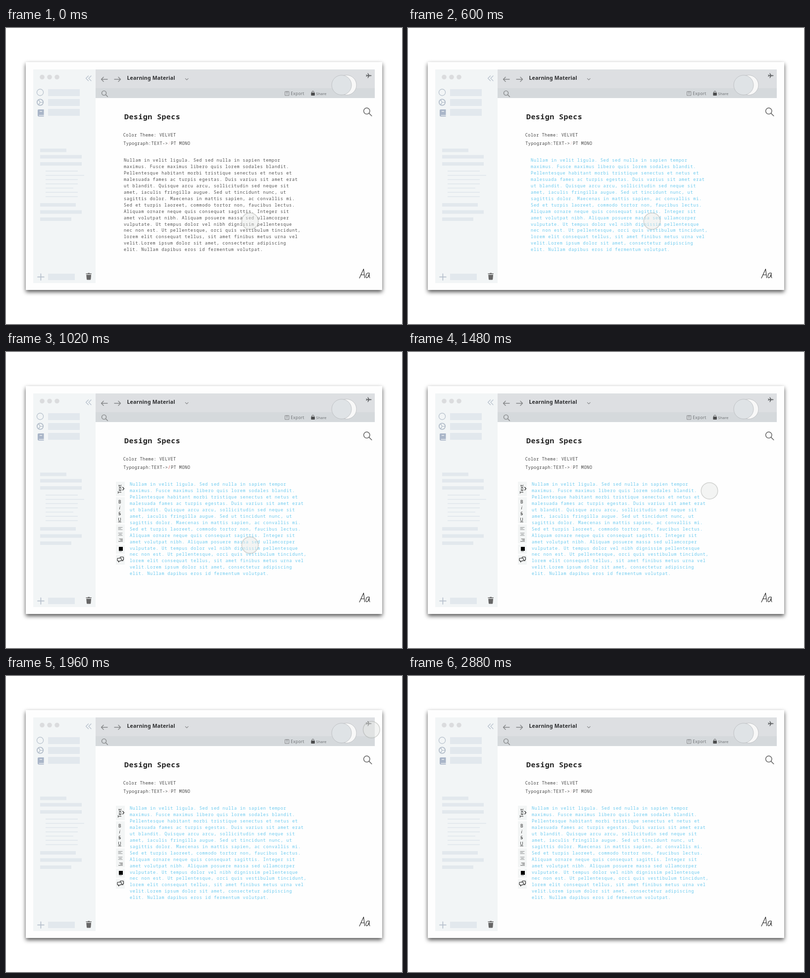
Recreate the animation shown at these times as an HTML page. Size 800 by 600 pixels, loop 3.34 s.

```html
<!DOCTYPE html>
<html lang="en">
<head>
<meta charset="utf-8">
<title>Text selection toolbar</title>
<style>
  html, body { margin: 0; width: 100%; height: 100%; overflow: hidden; background: #fff; }
  svg { display: block; }
  text { white-space: pre; }
  .line { fill: none; stroke-linecap: round; stroke-linejoin: round; }
  .mono { font-family: "Noto Sans Mono", "DejaVu Sans Mono", monospace; font-size: 8.5px; }
  .sans { font-family: "Noto Sans", "Open Sans", sans-serif; }
  .window { fill: #fefefe; filter: drop-shadow(0 4px 4px rgba(0, 0, 0, .68)); }
</style>
</head>
<body>
<svg width="800" height="600" viewBox="0 0 800 600">
  <defs><clipPath id="frame"><path d="M40 69h720v462H40z"/></clipPath></defs>
  <path class="window" d="M40 69h720v462H40z"/>

  <!-- sidebar -->
  <path fill="#f2f5f6" d="M55 84h126v433H55z"/>
  <g fill="#dbdcde">
    <circle cx="73" cy="99.5" r="4.8"/><circle cx="88" cy="99.5" r="4.8"/><circle cx="103" cy="99.5" r="4.8"/>
  </g>
  <g id="bars" fill="#e2e8ed"></g>
  <g class="line" stroke="#b6c0cc" stroke-width="1.2">
    <path d="M166.5 97l-5 5 5 5m5.5-10l-5 5 5 5"/>
    <circle cx="69" cy="130.5" r="6.6"/>
    <circle cx="69" cy="150.6" r="6.2" stroke-width="1.9"/>
    <path stroke-width="1.4" d="M69 150.6h5.5M69 150.6l-3-5M69 150.6l-3 5"/>
    <path stroke-width="1.7" d="M64 504.7h12.8M70.4 498.3v12.8"/>
  </g>
  <path fill="#a9b5c8" d="M66 165h10.5v11.5H66.5v1.3h10v1.7H66q-2-.3-2-2.500V167q0-2 2-2z"/>
  <path fill="#f2f5f6" d="M68 168.500h5v1.300h-5z"/>
  <path fill="#666" d="M161.500 497.500h3.500l.7-1h3l.7 1h3.400v1.500h-11.300zM162.200 500.200h9.900l-.8 9q-.1 1.300-1.300 1.300h-5.700q-1.200 0-1.300-1.300z"/>

  <!-- header -->
  <path fill="#dddfe2" d="M181 84h564v38H181z"/>
  <path fill="#d5d9dc" d="M181 122h564v20H181z"/>
  <g class="line" stroke="#858789" stroke-width="1.4">
    <path d="M205 104h-12.5m4.5-4.5l-4.5 4.5 4.5 4.5M219 104h12.5m-4.5-4.5l4.5 4.5-4.5 4.5"/>
    <path stroke-width="1.1" d="M362.3 102.3l2.9 2.9 2.9-2.9"/>
    <circle cx="198" cy="131.9" r="4.5"/><path d="M201.4 135.3l4 4"/>
    <path stroke-width="1" d="M566 128.8h-2.3v8h8v-8h-2.3M567.700 134.500v-6m-1.700 1.500l1.700-1.700 1.700 1.700"/>
  </g>
  <path class="line" stroke="#555" d="M617.800 131.500v-1.600q.3-2 2.300-2t2.200 2"/>
  <rect x="616.3" y="131" width="7.6" height="6" rx=".8" fill="#4c4d4e"/>
  <g class="sans">
    <text x="244.5" y="104.6" font-size="10.5" font-weight="600" letter-spacing=".17" fill="#2b2c2e">Learning Material</text>
    <g fill="#707376" font-weight="500">
      <text x="575.3" y="135.8" font-size="8.2" letter-spacing=".4">Export</text>
      <text x="626.3" y="135.8" font-size="7.9">Share</text>
    </g>
  </g>
  <g stroke="#b2b5b8" stroke-width=".7">
    <circle cx="687.8" cy="115.7" r="20.2" fill="#f8f8f8"/>
    <circle cx="678" cy="115.7" r="20" fill="#dfe3e6"/>
  </g>
  <path fill="#66686a" d="M738.5 96.500q0-.9-1.500-.9h-3l-2.500-4h-1.200l1.200 4h-2.300l-1-1.400h-.9l.6 2.300-.6 2.300h.9l1-1.400h2.300l-1.200 4h1.200l2.500-4h3q1.500 0 1.500-.9z"/>

  <!-- document -->
  <g class="line" stroke="#666" stroke-width="1.5">
    <circle cx="728.8" cy="168.3" r="6.2"/><path d="M733.4 172.9l5.4 5.4"/>
  </g>
  <path class="line" stroke="#222" stroke-width="1.1" d="M714 507l8.500-18.500 2 18M717.200 500.500l6.800-.5M734 496.800q-5-1.500-6.600 4t1.500 5.700q3.800-1.500 5.100-9.700-1 6.500 1 9.700"/>
  <text class="mono" x="239" y="185" style="font-size:15px" font-weight="700" letter-spacing=".43" fill="#222">Design Specs</text>
  <g class="mono" letter-spacing=".53" fill="#444">
    <text x="236.7" y="220.2">Color Theme: VELVET</text>
    <text x="237.2" y="237.4">Typograph:TEXT-&gt;<tspan id="slash" fill="#d0524e">/</tspan>PT MONO</text>
  </g>
  <g id="body" class="mono" letter-spacing=".76"></g>

  <!-- formatting toolbar -->
  <g id="tools">
    <path fill="#f3f5f5" d="M222 263h18v29h-18zM222 294.500h18v52.500h-18zM222 349.500h18v38.500h-18zM222 390.500h18v18.500h-18zM222 411.500h18v19.500h-18z"/>
    <g class="sans" fill="#222" font-size="8.5" text-anchor="middle">
      <text transform="translate(233.2 278) rotate(-90)" font-size="9.5">Text</text>
      <text x="229.7" y="307.2" font-weight="500">B</text>
      <text x="229.7" y="319" font-style="italic">i</text>
      <text x="229.7" y="331.2" text-decoration="line-through">S</text>
      <text x="229.7" y="343" text-decoration="underline">U</text>
    </g>
    <g class="line" stroke="#222" stroke-width="1.1">
      <path d="M235.700 274l2.800 3-2.800 3"/>
      <path stroke="#909293" d="M227 355.500h8M227 357.800h5M227 360h8M227 367h8M228.700 369.500h4.600M227 371.800h8"/>
      <path stroke="#555" d="M229 379h6.500M231.500 381.300h4M227.500 383.700h8"/>
      <path d="M230.500 417.500v-1q0-1 1-1h5q1 0 1 1v4q0 1-1 1h-.5v2l-2-1.500"/>
      <path fill="#f3f5f5" d="M226 418h6q1 0 1 1v3.500q0 1-1 1h-2.500l-2 2.300v-2.300H226q-1 0-1-1V419q0-1 1-1z"/>
    </g>
    <path d="M228 395h8v8h-8z"/>
    <path stroke="#999" d="M228.500 404.500h5.500"/>
  </g>

  <g clip-path="url(#frame)">
    <circle id="cursor" r="16.8" fill="rgba(228,231,229,.45)" stroke="rgba(150,152,148,.4)" stroke-width="1.5"/>
  </g>
</svg>
<script>
const LOOP = 3340;
const $ = id => document.getElementById(id);
const SVG = "http://www.w3.org/2000/svg";

function add(parent, tag, attrs, text = "") {
  const el = document.createElementNS(SVG, tag);
  for (const key in attrs) el.setAttribute(key, attrs[key]);
  el.textContent = text;
  parent.append(el);
}

const bar = (x, y, width, height) => add($("bars"), "rect", { x, y, width, height });
[124, 144, 164].forEach(y => bar(85, y, 64, 14));
bar(85, 498, 54, 13);
[[244.5, 53], [257.5, 84], [272, 84], [355, 72], [369.5, 84], [384, 63]]
  .forEach(([y, w]) => bar(69, y, w, 7));
[65, 78, 65, 65, 56, 65, 65].forEach((w, i) => bar(80, 289.2 + i * 8.6, w, 1.8));

`Nullam in velit ligula. Sed sed nulla in sapien tempor
maximus. Fusce maximus libero quis lorem sodales blandit.
Pellentesque habitant morbi tristique senectus et netus et
malesuada fames ac turpis egestas. Duis varius sit amet erat
ut blandit. Quisque arcu arcu, sollicitudin sed neque sit
amet, iaculis fringilla augue. Sed ut tincidunt nunc, ut
sagittis dolor. Maecenas in mattis sapien, ac convallis mi.
Sed et turpis laoreet, commodo tortor non, faucibus lectus.
Aliquam ornare neque quis consequat sagittis. Integer sit
amet volutpat nibh. Aliquam posuere massa sed ullamcorper
vulputate. Ut tempus dolor vel nibh dignissim pellentesque
nec non est. Ut pellentesque, orci quis vestibulum tincidunt,
lorem elit consequat tellus, sit amet finibus metus urna vel
velit.Lorem ipsum dolor sit amet, consectetur adipiscing
elit. Nullam dapibus eros id fermentum volutpat.`
  .split("\n").forEach((s, i) => add($("body"), "text", { x: 238, y: 270.8 + i * 12.97 }, s));

const span = (t, from, to) => Math.min(1, Math.max(0, (t - from) / (to - from)));
const ease = u => (1 - Math.cos(Math.PI * u)) / 2;
const mix = (a, b, u) => a + (b - a) * u;
const curve = (a, b, c, u) => mix(mix(a, b, u), mix(b, c, u), u);

function cursorAt(t) {
  if (t < 2360) {
    const u = ease(span(t, 1200, 2080) ** 0.71);
    return [curve(493, 644, 743, u), curve(391.5, 267, 101, u)];
  }
  const u = span(t, 2360, 2880);
  const out = u * (1.6 - 0.6 * u);
  return [mix(743, 783, out), mix(101, 38, out)];
}

function draw(t) {
  const blue = span(t, 460, 515);
  const rgb = [[80, 106], [80, 201], [80, 238]].map(([a, b]) => mix(a, b, blue));
  $("body").setAttribute("fill", `rgb(${rgb})`);
  $("body").setAttribute("transform", `translate(${12 * ease(span(t, 490, 640))})`);
  $("tools").setAttribute("opacity", ease(span(t, 620, 1020)));
  $("slash").setAttribute("opacity", t >= 940 && t < 1200 ? 1 : 0.25);
  $("cursor").setAttribute("transform", `translate(${cursorAt(t)})`);
}

const start = performance.now();
function tick() {
  draw((performance.now() - start) % LOOP);
  requestAnimationFrame(tick);
}
tick();
</script>
</body>
</html>
```
